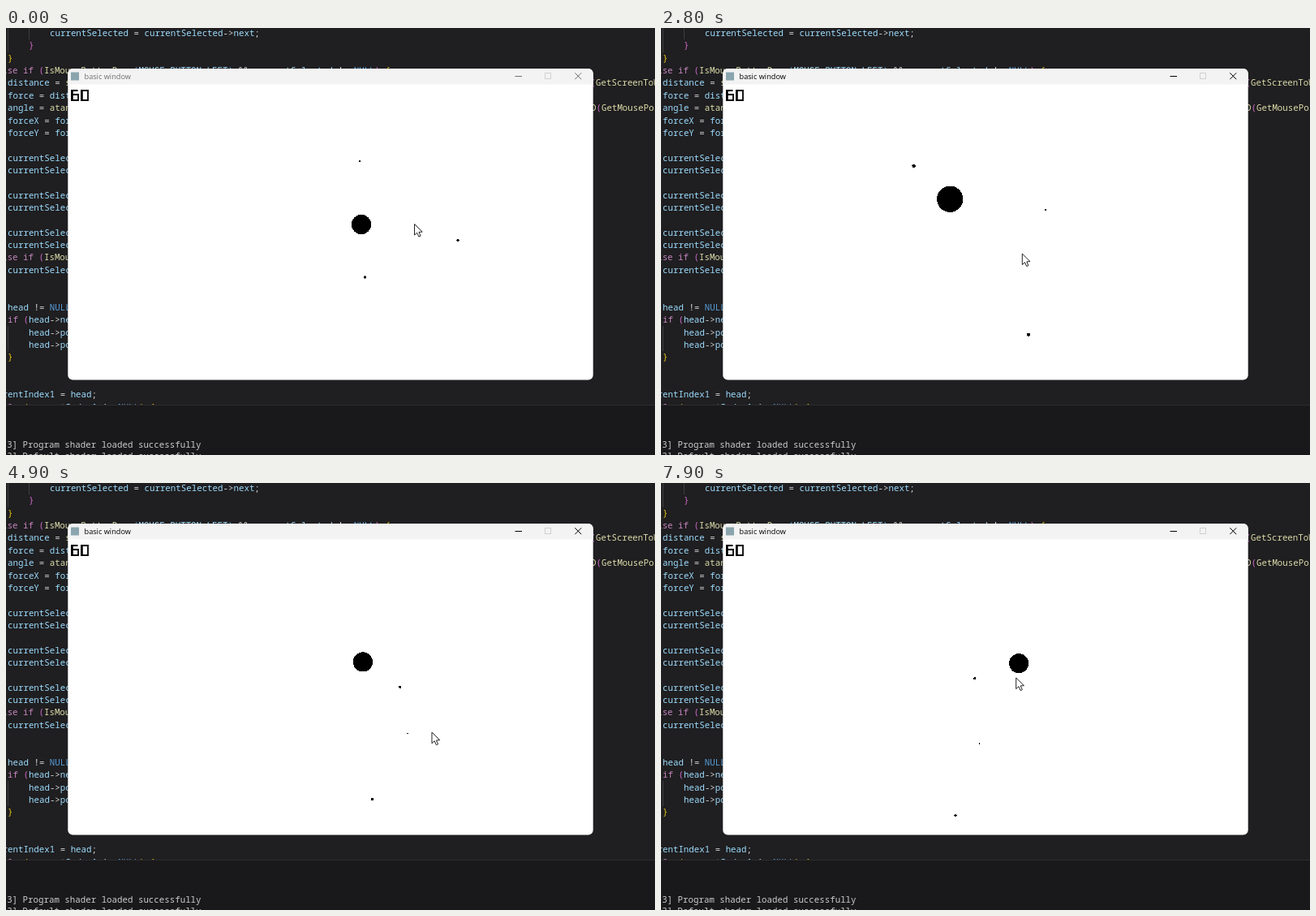
Recreate the animation shown at these times as an HTML page. Size 800 by 526 pixels, loop 8 s.

```html
<!DOCTYPE html>
<html lang="en">
<head>
<meta charset="utf-8">
<title>Orbit sandbox</title>
<style>
  html, body { margin: 0; width: 100%; height: 100%; overflow: hidden; background: #1f1e20; }
  svg { display: block; width: 800px; height: 526px; }
  .code { font: 10.79px "Noto Sans Mono", "DejaVu Sans Mono", monospace; white-space: pre; }
  .title { font: 9.2px "Open Sans", "Noto Sans", sans-serif; }
  .body { shape-rendering: crispEdges; }
</style>
</head>
<body>
<svg viewBox="0 0 800 526">
  <defs>
    <clipPath id="editorClip"><rect width="800" height="464"/></clipPath>
    <clipPath id="windowClip"><rect x="76.3" y="50" width="647.4" height="383.6" rx="6"/></clipPath>
  </defs>
  <rect width="800" height="526" fill="#1f1e20"/>
  <path d="M2.5 0V30M28.5 0V14M2.5 367V398" stroke="#3d3c3e"/>
  <g id="editor" clip-path="url(#editorClip)"></g>
  <rect y="464" width="800" height="62" fill="#19181a"/>
  <rect y="464" width="800" height="1" fill="#2d2c2e"/>
  <g id="terminal"></g>

  <g clip-path="url(#windowClip)">
    <rect x="76" y="50" width="648" height="384" fill="#fff"/>
    <rect x="76" y="50" width="648" height="19.5" fill="#f3f3f3"/>
    <rect x="80" y="54.5" width="10" height="10" fill="#8aa5ad"/>
    <g id="caption" fill="#000" stroke="#000">
      <text class="title" x="96.5" y="62.8" stroke="none">basic window</text>
      <path d="M627.5 59.5H636M701.3 55.3L709.2 63.2M709.2 55.3L701.3 63.2" fill="none"/>
    </g>
    <rect x="664.5" y="55.5" width="7" height="7" fill="none" stroke="#d0d0d0"/>
    <g aria-label="60" fill="none" stroke="#000">
      <path d="M88.5 77H81V89H89V82H81M93 77H101V89H93Z" stroke-width="1.8"/>
      <path d="M81.5 76V90M93.5 76V90" stroke-width="2.6"/>
    </g>
    <g id="bodies"></g>
  </g>
  <path id="cursor" d="M0 0V13.6L3.2 10.7L5.4 15.6L7.6 14.6L5.5 9.9L9.7 9.6Z"
    fill="#fff" stroke="#222" stroke-width="1" stroke-linejoin="round"/>
</svg>
<script>
const NS = 'http://www.w3.org/2000/svg';
const LOOP = 8000, STEP = 100, FOCUS_TIME = 0.6, RAD = Math.PI / 180;

const COLORS = { v: '#9cdcfe', o: '#d4d4d4', k: '#c586c0', f: '#dcdcaa', y: '#e8c91c', p: '#d06ccc', b: '#569cd6', t: '#cccccc' };

// Each entry: line number, left edge, then "colour:text" runs.
const assign = name => ['v:' + name, 'o: = '];
const selected = line => [line, 2, 'v:currentSelected'];
const code = [
  [0, 54, ...assign('currentSelected'), 'v:currentSelected', 'o:->', 'v:next', 'o:;'],
  [1, 28, 'p:}'],
  [2, 2, 'y:}'],
  [3, -11.3, 'k:else if ', 'p:(', 'f:IsMouseButtonDown', 'b:(', 'v:MOUSE_BUTTON_LEFT', 'b:)', 'o: && ', 'v:currentSelected', 'o: != ', 'b:NULL', 'p:)', 'y: {'],
  [4, 2, ...assign('distance'), 'f:sqrt'],
  [4, 720.6, 'p:(', 'f:GetScreenToWorld2D'],
  [5, 2, ...assign('force'), 'v:distance'],
  [6, 2, ...assign('angle'), 'f:atan2'],
  [6, 721, 'f:D', 'p:(', 'f:GetMousePosition'],
  [7, 2, ...assign('forceX'), 'v:force'],
  [8, 2, ...assign('forceY'), 'v:force'],
  ...[10, 11, 13, 14, 16, 17, 19].map(selected),
  [18, -11.3, 'k:else if ', 'p:(', 'f:IsMouseButton'],
  [22, -4.4, 'y:(', 'v:head', 'o: != ', 'b:NULL'],
  [23, 2, 'k:if ', 'p:(', 'v:head', 'o:->', 'v:next'],
  [24, 28, 'v:head', 'o:->', 'v:pos'],
  [25, 28, 'v:head', 'o:->', 'v:pos'],
  [26, 2, 'y:}'],
  [29, -23.9, ...assign('currentIndex1'), 'v:head', 'o:;'],
  [30, -17, 'k:while ', 'y:(', 'v:currentIndex1', 'o: != ', 'b:NULL', 'y:) {']
];

const $ = id => document.getElementById(id);

function add(parent, tag, attrs, text) {
  const el = document.createElementNS(NS, tag);
  for (const k in attrs) el.setAttribute(k, attrs[k]);
  if (text) el.textContent = text;
  parent.append(el);
  return el;
}

function writeLine(parent, x, y, runs) {
  const line = add(parent, 'text', { class: 'code', x, y });
  for (const run of runs) add(line, 'tspan', { fill: COLORS[run[0]] }, run.slice(2));
}

for (const [row, x, ...runs] of code) writeLine($('editor'), x, 10 + row * 15.36, runs);
['Program', 'Default'].forEach((name, i) =>
  writeLine($('terminal'), 1.2, 517.3 + i * 13.5, [`t:3] ${name} shader loaded successfully`]));

// Pointer stops: time in seconds and tip position. On the way to a stop the
// pointer may drag the view or zoom it by a factor around the tip.
const stops = [
  { t: 0, x: 503.5, y: 241.5 },
  { t: 0.5, x: 467.2, y: 276.1 },
  { t: 0.7, x: 467.2, y: 276.1, zoom: 4 / 3 },
  { t: 1.3, x: 394, y: 254.5, drag: true },
  { t: 1.5, x: 394, y: 254.5 },
  { t: 2.3, x: 619, y: 262 },
  { t: 2.8, x: 445.3, y: 278 },
  { t: 3.6, x: 494.3, y: 261, drag: true },
  { t: 4, x: 588.5, y: 289 },
  { t: 4.2, x: 588.5, y: 289, zoom: 3 / 4 },
  { t: 4.3, x: 576.3, y: 290.2, drag: true },
  { t: 4.5, x: 522, y: 302 },
  { t: 5.6, x: 530.2, y: 316 },
  { t: 6.7, x: 497, y: 310.3 },
  { t: 7.2, x: 447, y: 268 },
  { t: 7.9, x: 437.7, y: 240 }
];

// Replays the pointer up to time t and returns its tip and the view.
function replay(t) {
  let sunX = 438, sunY = 242, scale = 1, { x, y } = stops[0];
  for (let i = 1; i < stops.length && t > stops[i - 1].t; i++) {
    const from = stops[i - 1], to = stops[i];
    const u = Math.min(1, (t - from.t) / (to.t - from.t));
    const dx = (to.x - from.x) * u, dy = (to.y - from.y) * u;
    x = from.x + dx;
    y = from.y + dy;
    if (to.drag) {
      sunX += dx;
      sunY += dy;
    }
    if (to.zoom) {
      const k = 1 + (to.zoom - 1) * u;
      sunX = x + (sunX - x) * k;
      sunY = y + (sunY - y) * k;
      scale *= k;
    }
  }
  // The whole system drifts slowly.
  return { x, y, scale, sunX: sunX + 0.4 * t, sunY: sunY + 0.6 * t };
}

// Kepler ellipse with the sun in one focus; angles in degrees, rate per second.
function orbit({ a, e, tilt, phase, rate }, t) {
  const mean = (phase + rate * t) * RAD;
  let E = mean;
  for (let i = 0; i < 8; i++) E -= (E - e * Math.sin(E) - mean) / (1 - e * Math.cos(E));
  const x = a * (Math.cos(E) - e), y = a * Math.sqrt(1 - e * e) * Math.sin(E);
  const c = Math.cos(tilt * RAD), s = Math.sin(tilt * RAD);
  return [x * c - y * s, x * s + y * c];
}

const bodies = [
  { r: 12.1, a: 0, e: 0, tilt: 0, phase: 0, rate: 0 },
  { r: 1.65, a: 53.5, e: 0.23, tilt: 282.3, phase: -205, rate: 59.3 },
  { r: 0.95, a: 94.1, e: 0.175, tilt: -75.9, phase: -10.7, rate: 26.3 },
  { r: 1.65, a: 185.3, e: 0.361, tilt: -12, phase: 9.5, rate: 9.58 }
];
for (const b of bodies) b.el = add($('bodies'), 'circle', { class: 'body' });

function draw(ms) {
  const t = Math.floor(ms % LOOP / STEP) * STEP / 1000;
  const { x, y, scale, sunX, sunY } = replay(t);
  for (const b of bodies) {
    const [dx, dy] = orbit(b, t);
    b.el.setAttribute('cx', sunX + dx * scale);
    b.el.setAttribute('cy', sunY + dy * scale);
    b.el.setAttribute('r', b.r * scale);
  }
  $('cursor').setAttribute('transform', `translate(${x} ${y})`);
  $('caption').setAttribute('opacity', t < FOCUS_TIME ? 0.55 : 1);
}

const start = performance.now();
function tick() {
  draw(performance.now() - start);
  requestAnimationFrame(tick);
}
tick();
</script>
</body>
</html>
```
